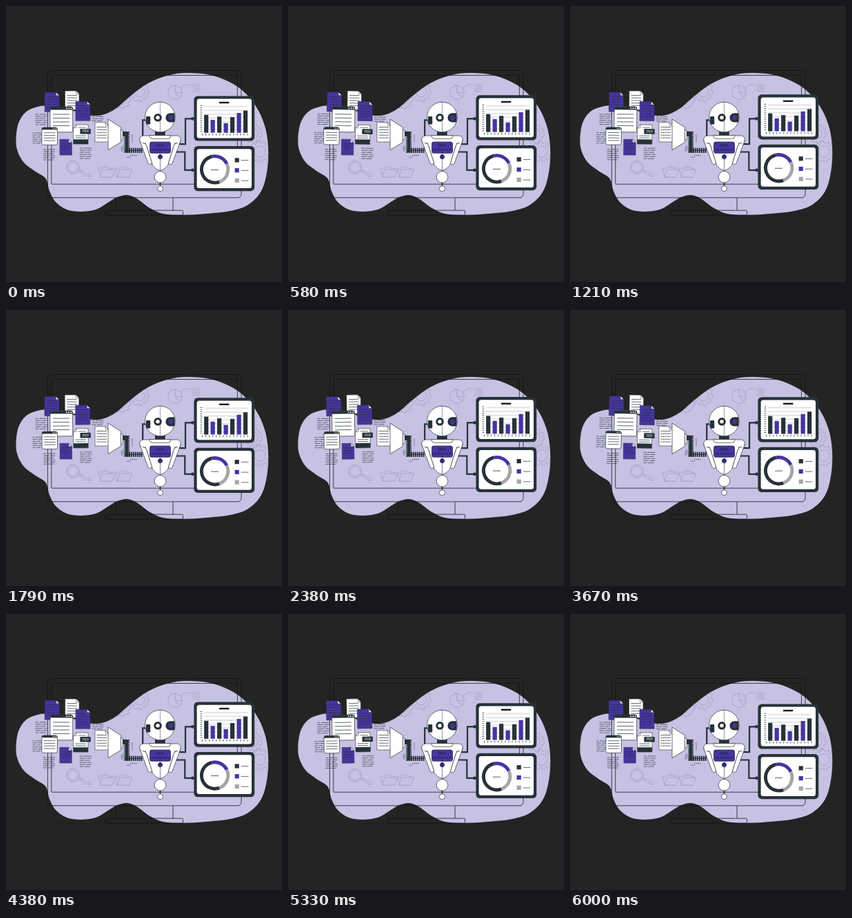
Write an HTML page with a canvas that moves like this. It is 400x400 px and loops after 6.04 s.

```html
<!DOCTYPE html>
<html lang="en">
<head>
<meta charset="utf-8">
<title>Data extraction</title>
<style>
html, body { margin: 0; width: 100%; height: 100%; overflow: hidden; background: #242424; }
canvas { display: block; width: 400px; height: 400px; }
</style>
</head>
<body>
<canvas id="stage"></canvas>
<script>
const LOOP = 6040, FLOAT = 6000, WIND = 3000, LIFT = 5.4;
const DARK = '#263238', PURPLE = '#4634a0', LILAC = '#c7c1e3', GRAY = '#a6a6a6', WHITE = '#fff';
const FAINT = 'rgba(30,24,55,.24)';
const canvas = document.getElementById('stage');
const c = canvas.getContext('2d');
const dpr = window.devicePixelRatio || 1;
canvas.width = canvas.height = 400 * dpr;

function paint(fill, stroke, width = 0.7) {
  if (fill) { c.fillStyle = fill; c.fill(); }
  if (stroke) { c.strokeStyle = stroke; c.lineWidth = width; c.stroke(); }
}
function box(x, y, w, h, r, fill, stroke, width) {
  c.beginPath();
  c.roundRect(x, y, w, h, r);
  paint(fill, stroke, width);
}
function disc(x, y, r, fill, stroke, width) {
  c.beginPath();
  c.arc(x, y, r, 0, Math.PI * 2);
  paint(fill, stroke, width);
}
function shape(d, fill, stroke, width = 0.7) {
  const p = new Path2D(d);
  if (fill) { c.fillStyle = fill; c.fill(p); }
  if (stroke) { c.strokeStyle = stroke; c.lineWidth = width; c.stroke(p); }
}
function rule(x1, y1, x2, y2, color = DARK, width = 0.7) {
  c.beginPath();
  c.moveTo(x1, y1);
  c.lineTo(x2, y2);
  paint(null, color, width);
}
function rules(x1, x2, y, step, n, color, width) {
  for (let i = 0; i < n; i++) rule(x1, y + i * step, x2, y + i * step, color, width);
}
function label(text, x, y, size, color, weight = '') {
  c.font = `${weight} ${size}px "Liberation Sans", Arial, sans-serif`;
  c.textAlign = 'center';
  c.textBaseline = 'middle';
  c.fillStyle = color;
  c.fillText(text, x, y);
}

const edge = [[14.5, 194], [18, 170], [29, 153.5], [46, 146], [64, 145], [94, 151], [122, 158.5],
  [141, 157.5], [160, 148], [181, 130], [206, 112], [235, 100.5], [264, 97], [300, 101],
  [335, 116.5], [360, 142], [374.5, 172], [380, 204], [378.5, 238], [370, 268], [351, 288],
  [325, 297], [290, 301], [255, 303], [227, 301], [207, 292], [191, 280], [176, 274],
  [161, 277], [146, 286], [130, 295], [108, 298], [88, 295], [72, 284], [63, 268],
  [57.5, 250], [42, 239.5], [26, 227], [17, 211]];

function blob() {
  const n = edge.length, at = i => edge[(i + n) % n];
  c.beginPath();
  c.moveTo(...edge[0]);
  for (let i = 0; i < n; i++) {
    const [a, b, d, e] = [at(i - 1), at(i), at(i + 1), at(i + 2)];
    c.bezierCurveTo(b[0] + (d[0] - a[0]) / 6, b[1] + (d[1] - a[1]) / 6,
      d[0] - (e[0] - b[0]) / 6, d[1] - (e[1] - b[1]) / 6, d[0], d[1]);
  }
  c.closePath();
  paint(LILAC);
}

function gear(x, y, r) {
  const teeth = 10, step = Math.PI * 2 / teeth;
  c.beginPath();
  for (let i = 0; i < teeth; i++) {
    const a = i * step;
    c.arc(x, y, r, a, a + step * 0.42);
    c.arc(x, y, r * 0.82, a + step * 0.55, a + step * 0.87);
  }
  c.closePath();
  paint(null, FAINT);
  disc(x, y, r * 0.55, null, FAINT);
}

function backdrop() {
  gear(193, 124, 14.5);
  gear(167, 135, 14);
  gear(358, 185, 13.5);
  gear(368, 211, 15);
  disc(245, 125.3, 10.3, null, FAINT);
  shape('M245 115V125.3H255.3M245 125.3L252.5 132.5M253 119L260 114H268', null, FAINT);
  rules(270.5, 282, 114, 3.1, 4, FAINT);
  disc(97, 233.7, 9.6, null, FAINT);
  disc(97, 233.7, 7.6, null, FAINT);
  shape('M105 238.5L108 240M108 238L121 244.5Q123 247 119.5 247.5L107 241Z', null, FAINT);
  for (const x of [134, 158.5]) {
    c.save();
    c.translate(x, 233);
    shape('M3 15L0 2H6L8 0H14L15 2H20V4M3 15L6 4H24L20 15Z', null, FAINT);
    c.restore();
  }
}

function monitor() {
  const ink = '#111216';
  rule(28, 303.2, 373, 303.2, '#1d1e21', 0.5);
  box(60.4, 93.5, 280.6, 184.3, 5, null, ink, 0.75);
  box(65.8, 100.5, 269.6, 157.7, 1, null, ink, 0.75);
  rule(159, 278, 159, 296, ink, 0.75);
  rule(242, 278, 242, 296, ink, 0.75);
  box(145, 296.2, 111.5, 7, 1, null, ink, 0.75);
}

// A sheet with one folded corner
function sheet(x, y, w, h, fill, left) {
  const f = 4.5;
  c.save();
  c.translate(left ? x + w : x, y);
  if (left) c.scale(-1, 1);
  shape(`M0 0H${w - f}L${w} ${f}V${h}H0Z`, fill, DARK, 0.6);
  shape(`M${w - f} 0V${f}H${w}Z`, WHITE, DARK, 0.5);
  c.restore();
}
function lined(x, y, w, h, fill) {
  sheet(x, y, w, h, fill);
  const n = Math.floor((h - 8) / 3.7);
  rules(x + 3, x + w - 3, y + 6.5, 3.7, n, DARK, 0.7);
}
function win(x, y, w, h, head, dot) {
  box(x, y, w, h, 2.5, WHITE, DARK, 0.7);
  box(x, y, w, head, [2.5, 2.5, 0, 0], DARK);
  for (let i = 0; i < 3; i++) disc(x + w - dot * (2.2 + i * 3.2), y + head / 2, dot, WHITE);
}
function prose(x, y, w, n) {
  for (let i = 0; i < n; i++) {
    const cut = w * (0.3 + 0.4 * ((i * 0.618) % 1)), ly = y + i * 3;
    rule(x, ly, x + cut - 0.7, ly, DARK, 0.65);
    rule(x + cut + 0.7, ly, x + w - (i % 3 === 2 ? 2 : 0), ly, DARK, 0.65);
  }
}

function papers(deg) {
  c.save();
  c.translate(90, 173);
  c.rotate(deg * Math.PI / 180);
  c.translate(-90, -173);
  prose(42.5, 157, 17, 6);
  prose(124.5, 160.5, 17, 3);
  prose(38.5, 184, 13.5, 6);
  prose(54, 208, 17, 6);
  prose(107, 206, 17, 6);
  lined(56.2, 125.2, 21, 28, PURPLE);
  lined(85.5, 123, 20.5, 28, WHITE);
  rule(96, 151, 103, 151, DARK, 1.4);
  lined(101, 138.2, 21, 28, PURPLE);
  win(64, 146, 32.7, 36.8, 4.4, 1);
  rules(68, 92, 157, 5.5, 4, DARK, 0.75);
  win(52, 176, 22.4, 25.3, 3.2, 0.7);
  rules(55, 71.5, 183.7, 3.8, 4, DARK, 0.7);
  sheet(97.7, 172, 21.3, 28, WHITE, true);
  rules(105, 116, 176, 3, 1);
  rules(100.5, 116, 188, 3, 2);
  box(97.7, 193.2, 21.3, 6.8, 0, DARK);
  box(107.4, 178, 15.4, 7.5, 0.5, DARK);
  label('PDF', 115.6, 182, 4.8, WHITE);
  lined(78, 193.3, 17.3, 22.7, PURPLE);
  c.restore();
}

function funnel() {
  sheet(129, 168.8, 19.5, 28.2, WHITE);
  rules(131.5, 146, 175.5, 3.9, 5);
  shape('M148 164L166.5 176V197.5L148 208.5Z', WHITE, DARK, 0.7);
  box(166.5, 180, 2.7, 14, 0, WHITE, DARK, 0.6);
  box(169, 181.8, 6, 7, 1, DARK);
  rule(175, 183, 175, 211, DARK, 4);
  for (let i = 0; i < 11; i++) box(171, 182 + i * 2.85, 8.2, 1.8, 0.9, DARK);
  for (let i = 0; i < 9; i++) box(172.5 + i * 2.9, 205.5, 1.9, 7.6, 0.9, DARK);
  rule(175, 209.3, 198, 209.3, DARK, 1);
  rule(183, 186, 183, 198, DARK, 0.5);
  rule(169.4, 202, 169.4, 210, DARK, 0.5);
  rule(167.4, 204, 167.4, 211, DARK, 0.5);
  rule(180, 216.6, 190, 216.6, DARK, 0.5);
  rule(175, 219, 181, 219, DARK, 0.5);
}

function robot() {
  shape('M206 165.3H198.2V190', null, DARK, 2.2);
  shape('M250 200.2H260V163.3H270', null, DARK, 2.2);
  shape('M246 211.5H259.3V237.8H270', null, DARK, 2.2);
  disc(270.5, 163.3, 2.4, DARK);
  disc(270.5, 237.8, 2.4, DARK);

  box(216, 180, 14.7, 9, 0, DARK);
  disc(223.4, 161, 21.8, WHITE, DARK, 0.7);
  rule(223.4, 139, 223.4, 183, DARK, 0.5);
  box(203, 160, 6.2, 11.5, 1, DARK);
  disc(220, 161.8, 5.8, DARK);
  disc(220, 161.8, 2.7, WHITE);
  shape('M244.2 155.3H238A6.6 6.6 0 0 0 238 168.5H244Q245.2 162 244.2 155.3Z', DARK);
  disc(238.7, 161.9, 3.3, PURPLE);

  shape('M201 194H246L234.5 231Q230 237 223.5 238.5Q217 237 212.5 231Z', WHITE, DARK, 0.7);
  shape('M199 188H248.5Q253.5 189 253.3 194L252 199H195L193.7 194Q193.5 189 199 188Z', WHITE, DARK, 0.7);
  box(203, 194, 41, 8, 2, WHITE);
  for (const side of [1, -1]) {
    c.save();
    c.translate(223.5, 0);
    c.scale(side, 1);
    shape('M29.7 195L17.5 228Q14.5 231.5 12 227.5L20 202Q21.5 198.5 25.5 198.5', WHITE, DARK, 0.7);
    c.restore();
  }
  box(208, 187.5, 31, 4.8, [0, 0, 4, 4], WHITE, DARK, 0.7);
  box(208.5, 197, 30, 16.2, 2.5, PURPLE, DARK, 0.8);
  label('DATA', 223.5, 202.2, 4.8, '#18203a');
  label('EXTRACTION', 223.5, 208.7, 4.1, '#18203a');
  rule(223.5, 213, 223.5, 240, DARK, 0.6);
  disc(223.5, 218.6, 3.1, '#35297c', DARK, 0.8);

  rule(223.5, 255, 223.5, 261, DARK, 1.8);
  disc(223.5, 247.8, 8.3, WHITE, DARK, 0.7);
  disc(223.5, 264.6, 4, WHITE, DARK, 0.7);
}

function frame(y) {
  box(272.4, y, 87.8, 65.2, 5.5, DARK);
  box(276.6, y + 4.2, 79.4, 56.8, 3.5, WHITE);
}

function charts(dy) {
  c.save();
  c.translate(0, dy);
  frame(130.4);
  box(309, 138.8, 14.3, 2.4, 0, '#15191f');
  rules(287, 350, 145.7, 5.6, 7, '#e2e2e4', 1.8);
  rules(281.5, 284.3, 144.5, 3.1, 13, DARK, 0.8);
  [157.8, 165, 160.3, 169.8, 161, 155, 151.5].forEach((top, i) =>
    box(287.1 + i * 9.48, top, 6.2, 183.7 - top, 0, i % 2 ? PURPLE : DARK));
  for (let i = 0; i < 14; i++) rule(284.5 + i * 5.05, 184.8, 284.5 + i * 5.05, 187.6, DARK, 0.8);

  frame(203);
  const arcs = [[-103, -25, PURPLE], [-25, 70, GRAY], [70, 257, DARK]];
  for (const [from, to, color] of arcs) {
    c.beginPath();
    c.arc(302.6, 236.9, 19.2, from * Math.PI / 180, to * Math.PI / 180);
    paint(null, color, 4.9);
  }
  rule(297, 237.4, 308, 237.4, DARK, 0.8);
  [DARK, PURPLE, GRAY].forEach((color, i) => {
    const y = 220.3 + i * 14.75;
    box(331.6, y, 6.2, 6.2, 0, color);
    rule(340.8, y + 3.3, 351.5, y + 3.3, DARK, 0.7);
  });
  c.restore();
}

// Triangle waves: up and back down, and a swing of one degree each way
const lift = t => -LIFT * (1 - Math.abs(1 - 2 * (t % FLOAT) / FLOAT));
function swing(t) {
  const p = (t % WIND) / WIND;
  return p < 0.25 ? p * 4 : p < 0.75 ? 2 - p * 4 : p * 4 - 4;
}

function draw(now) {
  const t = now % LOOP;
  c.setTransform(dpr, 0, 0, dpr, 0, 0);
  c.fillStyle = '#242424';
  c.fillRect(0, 0, 400, 400);
  blob();
  backdrop();
  monitor();
  papers(swing(t));
  funnel();
  robot();
  charts(lift(t));
}

const start = performance.now();
function tick() {
  draw(performance.now() - start);
  requestAnimationFrame(tick);
}
tick();
</script>
</body>
</html>
```
